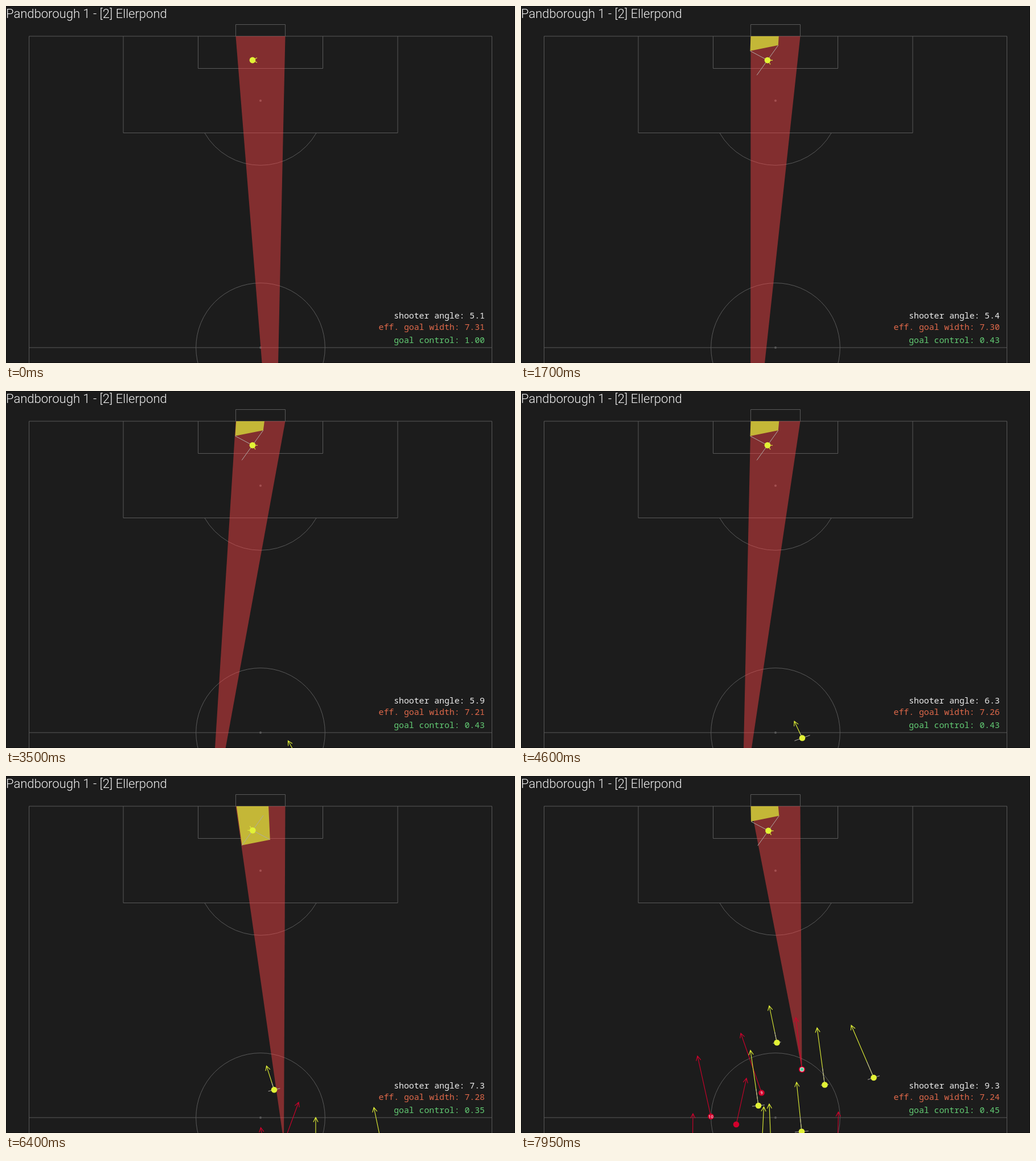
Write an HTML page that moves like this. It is 894 px wide and 626 px high and loops after 8000 ms.

```html
<!DOCTYPE html>
<html lang="en">
<head>
<meta charset="utf-8">
<title>Goal control</title>
<style>
  html, body { margin: 0; width: 100%; height: 100%; overflow: hidden; background: #1c1c1c; }
  svg { display: block; width: 894px; height: 626px; }
  .pitch { fill: none; stroke: #595959; }
  .title { font: 300 22px Roboto, sans-serif; fill: #f2f2f2; }
  .stat { font: 300 14.8px "Noto Sans Mono", monospace; text-anchor: end; white-space: pre; }
  .num { font: 7.5px Roboto, sans-serif; fill: #fff; text-anchor: middle; }
  .reach { fill: none; stroke: #b0aaa6; }
  .arrow { fill: none; stroke-width: 1.1; }
</style>
</head>
<body>
<svg viewBox="0 0 894 626">
  <rect width="894" height="626" fill="#1c1c1c"/>
  <rect x=".5" y=".5" width="893" height="625" fill="none" stroke="#101010"/>
  <g class="pitch">
    <path d="M40.5 626V53H853.5V626M40.5 599H853.5"/>
    <path d="M206 53V222.5H688V53M337.5 53V109.5H556.5V53"/>
    <path d="M403.5 53V32.5H490.5V53"/>
    <path d="M348.8 222.5A113.3 113.3 0 0 0 545.2 222.5"/>
    <circle cx="447" cy="599" r="113.3"/>
  </g>
  <g fill="#595959">
    <circle cx="447" cy="166" r="2"/>
    <circle cx="447" cy="599" r="2"/>
  </g>
  <polygon id="cone" fill="#ff4648" fill-opacity=".45"/>
  <polygon id="shadow" fill="#c4b737"/>
  <g id="live"></g>
  <text class="title" x="0" y="21">Pandborough 1 - [2] Ellerpond</text>
  <text class="stat" id="angle" x="841" y="547.5" fill="#eee"/>
  <text class="stat" id="width" x="841" y="568" fill="#e0694a"/>
  <text class="stat" id="control" x="841" y="590.5" fill="#63cc74"/>
</svg>
<script>
const LOOP = 8000, STEP = 50;
const GOAL = { left: 403.5, right: 490.5, y: 53, mid: 447, metres: 7.318 };
const SX = 11.956, SY = 10.4; // pixels per metre
const YELLOW = '#e2f236', RED = '#d2002c';
const $ = id => document.getElementById(id);

// Keys are [ms, x, y, vx, vy], velocity in pixels per second.
const ball = [
  [0, 472, 905, -50, -12],
  [1000, 426.7, 884, -40, -33],
  [2400, 382, 826, -32, -42],
  [3430, 357.5, 785, -6, -42],
  [4300, 371, 748, 50, -40],
  [4600, 388.6, 736, 62, -42],
  [5700, 460.8, 684, 55, -55],
  [6400, 488, 643, 26, -71],
  [7950, 493.5, 514.5, -11, -91]
];
const keeper = [
  [0, 433, 95, 0, 0],
  [5700, 433, 95.2, 0, 0],
  [7950, 434.5, 96, .6, .3]
];

// Late runners: position and velocity at 7950 ms, plus acceleration.
const runner = (x, y, vx, vy, ax = 0, ay = 0) => {
  const s = -1.55;
  return [
    [6400, x + vx * s + ax * s * s / 2, y + vy * s + ay * s * s / 2, vx + ax * s, vy + ay * s],
    [7950, x, y, vx, vy]
  ];
};
const yellows = [
  { reach: 470, keys: [
    [2000, 530, 672, -12, -18],
    [4600, 494, 608.5, -14, -29.5],
    [5700, 480.5, 576.5, -13, -33],
    [6400, 471, 550.3, -13.5, -42],
    [7950, 449.5, 467.5, -13.5, -64.5]
  ] },
  { reach: 700, keys: runner(533.5, 541.5, -13.5, -100, -8.7, -6.5) },
  { reach: 1100, keys: runner(619.5, 529, -39.5, -92, -14, -4.5) },
  { reach: 1080, keys: runner(417, 578, -14, -97, 0, -2) },
  { reach: 1040, keys: runner(493, 623.5, -9, -86.5) },
  { reach: 900, keys: runner(422, 670, 4.5, -90) },
  { reach: 900, keys: runner(440, 670, -4, -95) }
];
const reds = [
  { keys: runner(422.5, 555.5, -36.5, -104.5, -14, -10), num: 9 },
  { keys: runner(333.5, 597, -23.5, -106, -3, -5), num: 10 },
  { keys: runner(378, 611, 18, -81) },
  { keys: runner(301, 680, 1, -88) },
  { keys: runner(555.5, 674, 2, -85) }
];

// Cubic Hermite track, straight before the first and after the last key.
function at(keys, t) {
  const last = keys[keys.length - 1];
  const straight = ([t0, x, y, vx, vy]) => {
    const s = (t - t0) / 1000;
    return { x: x + vx * s, y: y + vy * s, vx, vy };
  };
  if (t <= keys[0][0]) return straight(keys[0]);
  if (t >= last[0]) return straight(last);
  const i = keys.findIndex(k => k[0] > t);
  const a = keys[i - 1], b = keys[i];
  const d = (b[0] - a[0]) / 1000, u = (t - a[0]) / 1000 / d;
  const axis = n => {
    const p = a[n], q = b[n], m = a[n + 2] * d, k = b[n + 2] * d;
    const c2 = 3 * (q - p) - 2 * m - k, c3 = 2 * (p - q) + m + k;
    return [p + u * (m + u * (c2 + u * c3)), (m + u * (2 * c2 + 3 * u * c3)) / d];
  };
  const [x, vx] = axis(1), [y, vy] = axis(2);
  return { x, y, vx, vy };
}

const f = n => n.toFixed(2);
const pt = p => f(p.x) + ' ' + f(p.y);
const points = list => list.map(pt).join(' ');
const off = (p, x, y) => ({ x: p.x + x, y: p.y + y });
const dot = (p, r, fill) => `<circle cx="${f(p.x)}" cy="${f(p.y)}" r="${r}" fill="${fill}"/>`;
const reach = d => `<path class="reach" d="${d}"/>`;

function arrow(p, tip, heading, color) {
  const barb = turn => off(tip, -9 * Math.cos(heading + turn), -9 * Math.sin(heading + turn));
  return `<path class="arrow" stroke="${color}" d="M${pt(p)}L${pt(tip)}` +
    `M${pt(barb(.48))}L${pt(tip)}L${pt(barb(-.48))}"/>`;
}

const runArrow = (p, color) => arrow(p, off(p, p.vx, p.vy), Math.atan2(p.vy, p.vx), color);

function yellowPlayer({ keys, reach: size }, t) {
  const p = at(keys, t);
  const half = size / Math.hypot(p.vx, p.vy);
  const px = -p.vy * SX / SY, py = p.vx * SY / SX;
  const k = half / Math.hypot(px, py);
  return runArrow(p, YELLOW) +
    reach(`M${pt(off(p, px * k, py * k))}L${pt(off(p, -px * k, -py * k))}` +
      `M${pt(p)}L${pt(off(p, p.vx * .3, p.vy * .3))}`) +
    dot(p, 5.3, YELLOW);
}

function redPlayer({ keys, num }, t) {
  const p = at(keys, t);
  const label = num ? `<text class="num" x="${f(p.x)}" y="${f(p.y + 2.7)}">${num}</text>` : '';
  return runArrow(p, RED) + dot(p, 5.3, RED) + label;
}

// Which way the keeper faces: 0 = not set, -1 = up left, 1 = down right.
const facing = t => t < 1400 ? 0 : t < 5400 ? -1 : t < 7050 ? 1 : -1;

function draw(t) {
  const b = at(ball, t), k = at(keeper, t), face = facing(t);
  const left = { x: GOAL.left, y: GOAL.y }, right = { x: GOAL.right, y: GOAL.y };
  $('cone').setAttribute('points', points([left, right, b]));

  let control = 1, arms = '', shadow = '';
  if (face) {
    const front = off(k, 30.5 * face, 16.3 * face);
    const up = off(k, 18.8, -26.2), down = off(k, -18.8, 26.2);
    const cast = p => p.x + (b.x - p.x) * (GOAL.y - p.y) / (b.y - p.y);
    const onGoal = p => ({ x: Math.min(GOAL.right, Math.max(GOAL.left, cast(p))), y: GOAL.y });
    const order = [front, up, down].sort((p, q) => cast(p) - cast(q));
    const near = order[0], far = order[2];
    const from = onGoal(near), to = onGoal(far);
    shadow = points([from, to, far, near]);
    control = 1 - (to.x - from.x) / (GOAL.right - GOAL.left);
    arms = reach(`M${pt(up)}L${pt(down)}M${pt(k)}L${pt(front)}`);
  }
  $('shadow').setAttribute('points', shadow);

  const heading = face ? Math.atan2(16.3 * face, 30.5 * face) : Math.PI;
  const carrier = t >= 5700
    ? runArrow(b, RED) + dot(b, 5.5, RED) + dot(b, 3.7, '#e8f4ee') + dot(b, 2.8, '#55cf9b')
    : '';
  $('live').innerHTML = arms + arrow(k, k, heading, YELLOW) + dot(k, 5.4, YELLOW) +
    reds.map(p => redPlayer(p, t)).join('') + carrier +
    yellows.map(p => yellowPlayer(p, t)).join('');

  const dx = b.x - GOAL.mid, dy = b.y - GOAL.y;
  const bearing = x => Math.atan2((x - b.x) / SX, dy / SY);
  const angle = (bearing(GOAL.right) - bearing(GOAL.left)) * 180 / Math.PI;
  const width = GOAL.metres * dy * dy / (dx * dx + dy * dy);
  $('angle').textContent = 'shooter angle: ' + angle.toFixed(1);
  $('width').textContent = 'eff. goal width: ' + width.toFixed(2);
  $('control').textContent = 'goal control: ' + control.toFixed(2);
}

const start = performance.now();
function tick() {
  const t = (performance.now() - start) % LOOP;
  draw(Math.floor(t / STEP) * STEP);
  requestAnimationFrame(tick);
}
tick();
</script>
</body>
</html>
```
